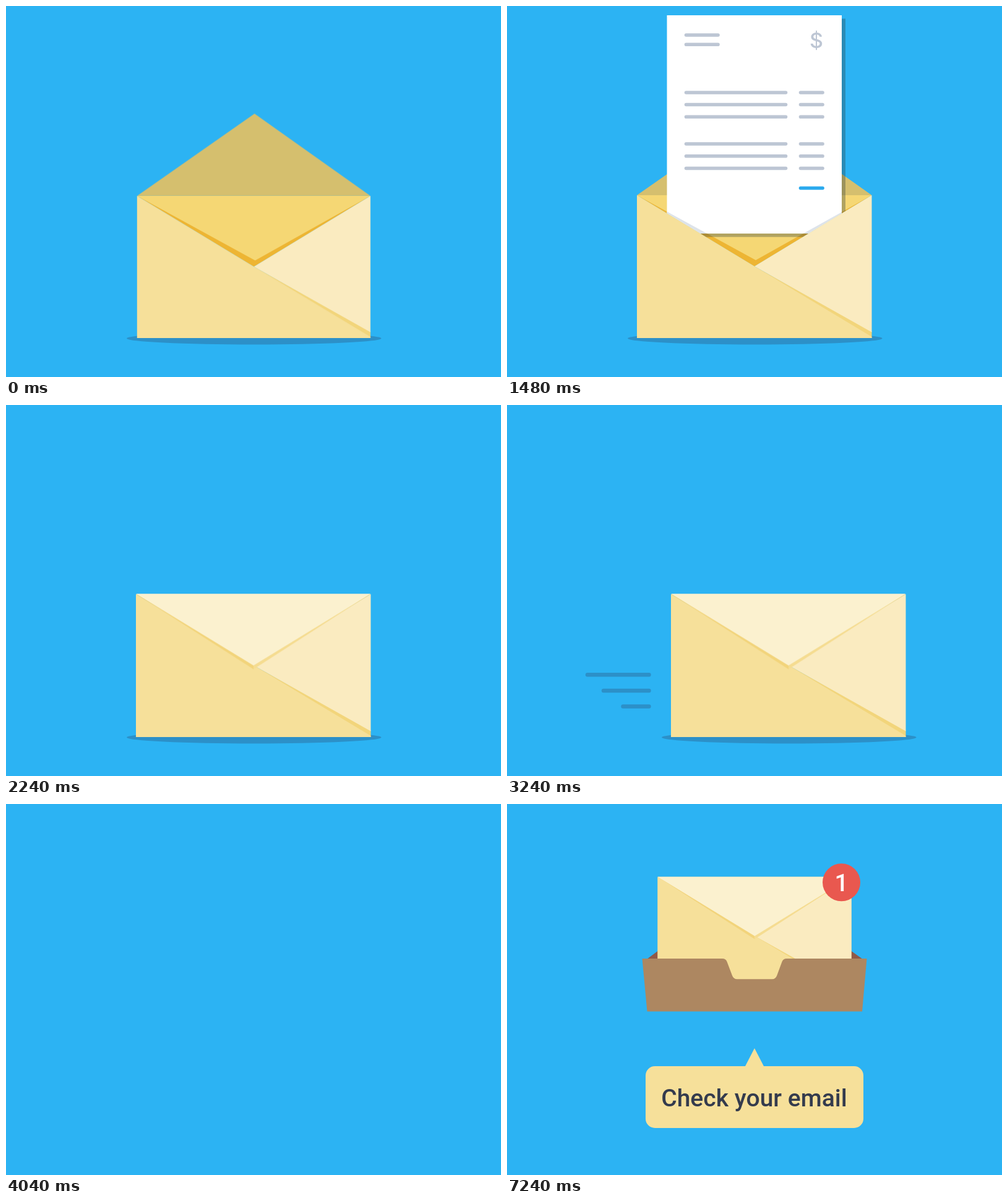
An HTML page that plays this animation: 800x600 px, repeating every 9.24 s.

```html
<!DOCTYPE html>
<html lang="en">
<head>
<meta charset="utf-8">
<title>Check your email</title>
<style>
  html, body { margin: 0; width: 100%; height: 100%; overflow: hidden; background: #2cb3f3; }
  svg { display: block; width: 100vw; height: 100vh; }

  /* One shared 9240 ms clock; every scene holds its pose until the next key. */
  .anim { animation: 9240ms step-end -4ms infinite both; }
  .slide { animation-name: slide; }
  .settle { animation-name: settle; }
  .drop { animation-name: drop; }
  .back { animation-name: back; }
  .front { animation-name: front; }
  .speed { animation-name: speed; }
  .tray { animation-name: tray; }
  .badge { animation-name: badge; }
  .tip { animation-name: tip; }

  @keyframes settle {
    0% { transform: matrix(.994, 0, 0, .9957, 3.06, 2.33); }
    10.8225%, 100% { transform: none; }
  }
  @keyframes drop {
    0% { transform: translateY(-900px); }
    10.8225% { transform: translateY(-660px); animation-timing-function: steps(11, end); }
    20.346%, 100% { transform: none; }
  }
  @keyframes back {
    0% { transform: none; }
    20.346% { transform: scaleY(.87); }
    20.996% { transform: scaleY(.645); }
    21.645% { transform: scaleY(.27); }
    22.294%, 100% { transform: scaleY(0); }
  }
  @keyframes front {
    0% { transform: scaleY(0); }
    22.294% { transform: scaleY(.165); }
    22.944% { transform: scaleY(.59); }
    23.593% { transform: scaleY(.9); }
    24.242%, 100% { transform: none; }
  }
  @keyframes slide {
    0% { transform: none; visibility: visible; }
    35.065% { transform: translateX(55px); visibility: visible; animation-timing-function: steps(8, end); }
    43.723%, 100% { transform: translateX(735px); visibility: hidden; }
  }
  @keyframes speed {
    0% { opacity: 0; }
    35.065%, 100% { opacity: 1; }
  }
  @keyframes tray {
    0% { opacity: 0; }
    54.545%, 100% { opacity: 1; }
  }
  @keyframes badge {
    0% { opacity: 0; }
    65.368%, 100% { opacity: 1; }
  }
  @keyframes tip {
    0% { opacity: 0; }
    78.355%, 100% { opacity: 1; }
  }

  .bars { fill: none; stroke: #bdc6d4; stroke-width: 5.6; stroke-linecap: round; }
  .dollar { font: 500 34px Inter, sans-serif; fill: #bdc6d4; text-anchor: middle; }
  .label { font: 500 39px Roboto, sans-serif; text-anchor: middle; }
</style>
</head>
<body>
<svg viewBox="0 0 800 600">
  <defs>
    <g id="pocket">
      <path fill="#f2d57b" d="M400 421L589.5 526V537H560Z"/>
      <path fill="#faebc0" d="M589.5 306L400 421L589.5 527.5Z"/>
      <path fill="#f6e09a" d="M210 306L400 421L589.5 535V537H210Z"/>
    </g>
    <g id="lid">
      <path fill="#f2d47b" d="M210 0L400 122V110Z"/>
      <path fill="#f5dc91" d="M589.5 0L400 122V110Z"/>
      <path fill="#fbf1cf" d="M210 0H589.5L400 116Z"/>
    </g>
    <path id="lip" d="M210 306L402 411L589.5 306L400 421Z"/>
    <clipPath id="sheet">
      <rect class="anim drop" x="258.5" y="315" width="282.5" height="353"/>
    </clipPath>
    <clipPath id="mouth">
      <path d="M0 -10H800V306H589.5L400 421L210 306H0Z"/>
    </clipPath>
  </defs>

  <g class="anim slide">
    <ellipse cx="400.8" cy="537.5" rx="205.7" ry="10" fill="#2c90c8"/>
    <path class="anim speed" d="M75 436.3H174.5M101 462H174.5M132.500 487.500H174.5"
      fill="none" stroke="#2c90c8" stroke-width="6.4" stroke-linecap="round"/>
    <g class="anim settle">
      <g transform="translate(0 306)">
        <path class="anim back" fill="#d5bf6e" d="M210 0L401 -133.500L589.5 0Z"/>
      </g>
      <path fill="#f5d774" d="M210 306H589.5L400 421Z"/>
      <use href="#lip" fill="#edb533"/>
      <g clip-path="url(#mouth)">
        <g class="anim drop">
          <rect x="264" y="320.500" width="283" height="353" fill="#283c3c" fill-opacity=".33"/>
          <rect x="258.5" y="315" width="282.5" height="353" fill="#fff"/>
          <path class="bars" d="M289.500 347H341M289.500 362.300H341
            M289.500 440H450.500M474.500 440H510M289.500 459.500H450.500M474.500 459.500H510
            M289.500 479.300H450.500M474.500 479.300H510M289.500 523H450.500M474.500 523H510
            M289.500 542.800H450.500M474.500 542.800H510M289.500 562.500H450.500M474.500 562.500H510"/>
          <path class="bars" style="stroke:#2caaee" d="M474.500 594.500H510"/>
          <text class="dollar" x="500" y="368.300">$</text>
        </g>
        <g clip-path="url(#sheet)"><use href="#lip" fill="#dde3ea"/></g>
      </g>
      <use href="#pocket"/>
      <g transform="translate(0 305.3)">
        <g class="anim front"><use href="#lid"/></g>
      </g>
    </g>
  </g>

  <g class="anim tray">
    <path fill="#8f5a48" d="M226 251L244 237.500H556L575 251Z"/>
    <g transform="translate(243.500 117.800) scale(.825) translate(-210 -305.300)">
      <path fill="#f6e09a" d="M210 305.300H589.500V537H210Z"/>
      <use href="#pocket"/>
      <use href="#lid" y="305.300"/>
    </g>
    <path fill="#ad8761" d="M218.500 250H348Q353.500 250 355.500 255L364 277.500Q366.200 283.300 372 283.300H428.500
      Q434 283.300 436.200 277.500L444.500 255Q446.500 250 452 250H581.500L574 335.500H226.500Z"/>
  </g>

  <g class="anim badge">
    <circle cx="540.5" cy="126.7" r="30.5" fill="#e9584f"/>
    <text class="label" x="540.5" y="141" fill="#fff">1</text>
  </g>

  <g class="anim tip">
    <path fill="#f6e09a" d="M400 395L415.500 425H384.500Z"/>
    <rect x="224" y="424" width="352" height="100" rx="15" fill="#f6e09a"/>
    <text class="label" x="399.500" y="488.500" fill="#343b4d">Check your email</text>
  </g>
</svg>
</body>
</html>
```
